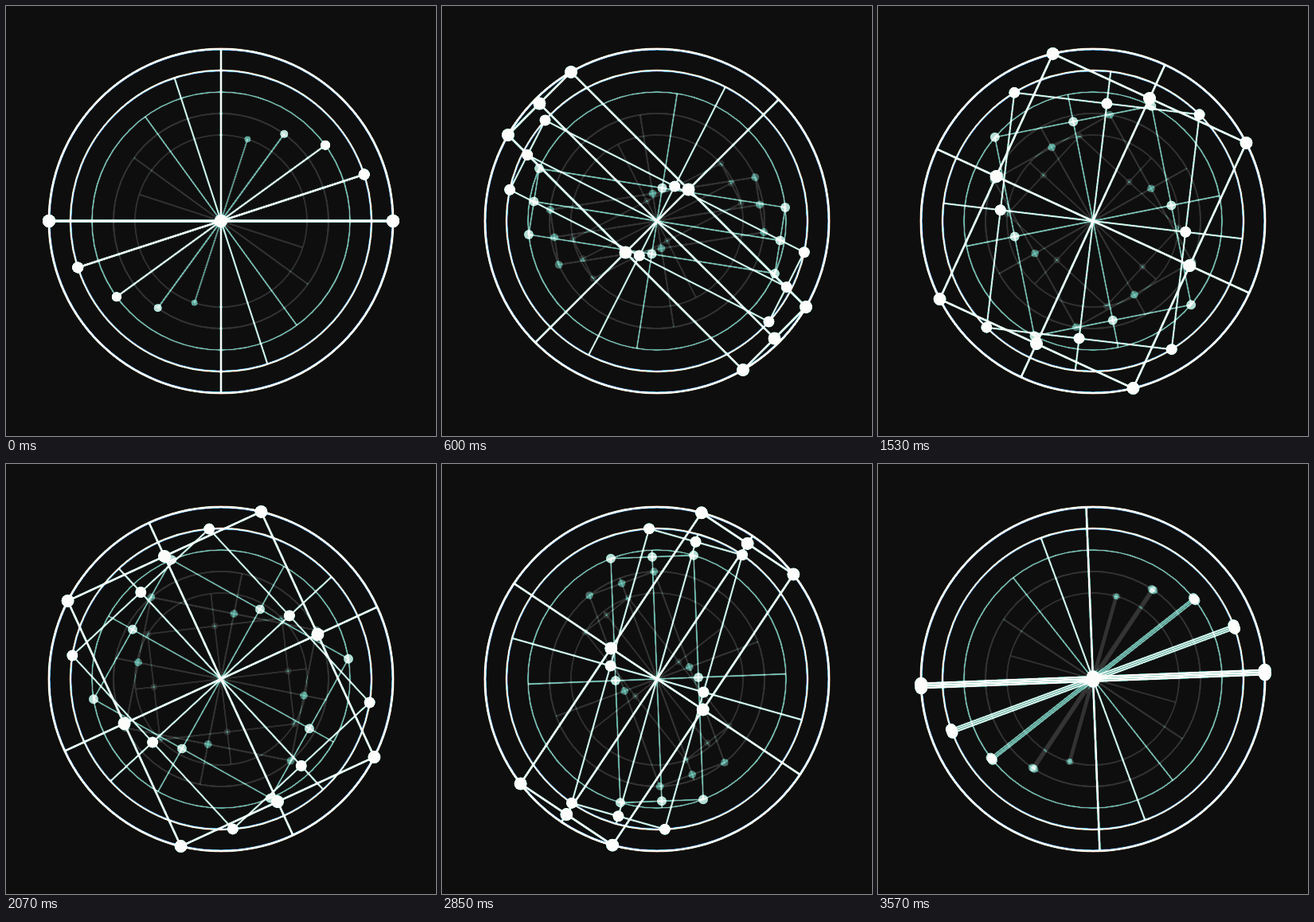
Write an HTML page with a canvas that moves like this. It is 540 px wide and 540 px high and loops after 3.6 s.

```html
<!DOCTYPE html>
<html>
<head>
<meta charset="utf-8">
<style>
html, body { margin: 0; width: 100%; height: 100%; overflow: hidden; background: #0e0e0e; }
canvas { display: block; }
</style>
</head>
<body>
<canvas width="540" height="540"></canvas>
<script>
const SIZE = 540, CENTER = 270, LOOP = 3600, STEP = 30, TAU = Math.PI * 2;
const ctx = document.querySelector('canvas').getContext('2d', { willReadFrequently: true });

const rings = [
  { alpha: 1, dotAlpha: 1, width: 2.5 },
  { alpha: 0.82, dotAlpha: 1, width: 2 },
  { alpha: 0.58, dotAlpha: 0.72, width: 1.6 },
  { alpha: 0.22, dotAlpha: 0.36, width: 1.6 },
  { alpha: 0.15, dotAlpha: 0.18, width: 1.6 },
].map((ring, i) => ({ ...ring, radius: 216 - 27 * i, dot: 8 - i, offset: i * TAU / 20 }));

// Brightness to colour: dark grey, teal, pale teal, white.
const stops = [
  [0, 14, 14, 14], [0.05, 14, 14, 14], [0.13, 44, 44, 44], [0.3, 52, 52, 52],
  [0.42, 88, 160, 148], [0.58, 105, 185, 172], [0.75, 195, 228, 220],
  [0.9, 252, 252, 250], [1, 252, 252, 250],
];
const tones = Array.from({ length: 256 }, (_, level) => {
  const v = level / 255;
  const i = Math.max(1, stops.findIndex(s => s[0] >= v));
  const [a, b] = [stops[i - 1], stops[i]];
  const mix = (v - a[0]) / (b[0] - a[0]);
  return [1, 2, 3].map(c => a[c] + (b[c] - a[c]) * mix);
});

const polar = (radius, angle) =>
  [CENTER + radius * Math.cos(angle), CENTER - radius * Math.sin(angle)];
const middle = (a, b) => [(a[0] + b[0]) / 2, (a[1] + b[1]) / 2];

function strokeSoft(path, { alpha, width }) {
  ctx.globalAlpha = 0.11 * Math.min(1, alpha + 0.3);
  ctx.lineWidth = width + 2;
  ctx.stroke(path);
  ctx.globalAlpha = alpha;
  ctx.lineWidth = width;
  ctx.stroke(path);
}

function circle(x, y, radius) {
  const path = new Path2D();
  path.arc(x, y, radius, 0, TAU);
  return path;
}

function line(a, b, ring) {
  const path = new Path2D();
  path.moveTo(...a);
  path.lineTo(...b);
  strokeSoft(path, ring);
}

function drawRing(ring, phase) {
  const { radius, offset, dot } = ring;
  // Two diameters turn at different speeds; the cross bisects them.
  const slow = offset - phase * TAU / 2;
  const fast = offset - phase * TAU;
  const axis = (slow + fast) / 2;
  const corners = [slow, fast, slow + Math.PI, fast + Math.PI].map(a => polar(radius, a));
  const sides = corners.map((p, i) => [p, corners[(i + 1) % 4]]);

  strokeSoft(circle(CENTER, CENTER, radius), ring);
  for (const a of [axis, axis + TAU / 4]) line(polar(radius, a), polar(-radius, a), ring);
  for (const [a, b] of sides) line(a, b, ring);

  ctx.globalAlpha = ring.dotAlpha;
  for (const [x, y] of [...corners, ...sides.map(s => middle(...s))]) ctx.fill(circle(x, y, dot));
}

function applyTones() {
  const image = ctx.getImageData(0, 0, SIZE, SIZE);
  const px = image.data;
  for (let i = 0; i < px.length; i += 4) {
    const tone = tones[px[i]];
    for (let c = 0; c < 3; c++) px[i + c] = tone[c];
  }
  ctx.putImageData(image, 0, 0);
}

function drawFringes() {
  ctx.globalCompositeOperation = 'lighter';
  ctx.globalAlpha = 0.35;
  ctx.lineWidth = 1;
  for (const { radius, width } of rings.slice(0, 2)) {
    for (const [color, side] of [['#f63', 1], ['#36f', -1]]) {
      ctx.strokeStyle = color;
      ctx.stroke(circle(CENTER, CENTER, radius + side * width / 2));
    }
  }
  ctx.globalCompositeOperation = 'source-over';
}

function render(now) {
  const phase = Math.floor(now % LOOP / STEP) * STEP / LOOP;
  ctx.globalAlpha = 1;
  ctx.fillStyle = '#000';
  ctx.fillRect(0, 0, SIZE, SIZE);
  ctx.fillStyle = ctx.strokeStyle = '#fff';
  for (const ring of rings) drawRing(ring, phase);
  applyTones();
  drawFringes();
}

const start = performance.now();
function tick() {
  render(performance.now() - start);
  requestAnimationFrame(tick);
}
tick();
</script>
</body>
</html>
```
